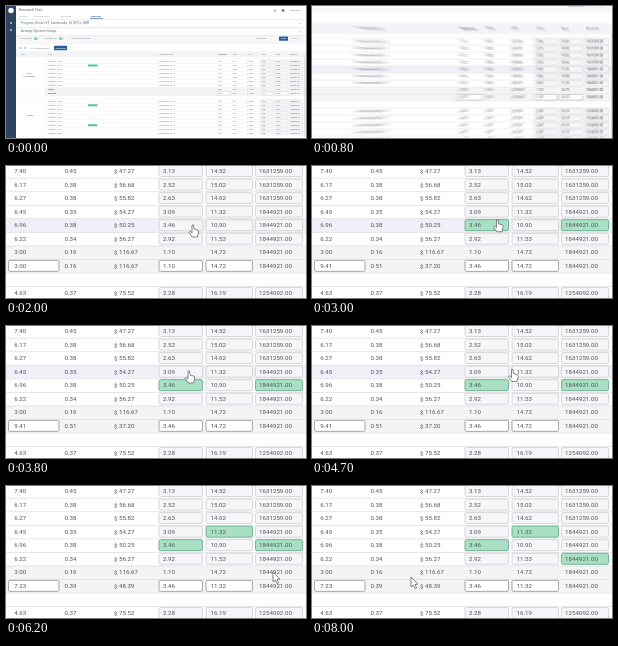
Recreate the animation shown at these times as an HTML page with a canvas. Size 300 px wide and 132 px high, loop 8100 ms.

```html
<!DOCTYPE html>
<html lang="en">
<head>
<meta charset="utf-8">
<style>
html, body { margin: 0; width: 100%; height: 100%; overflow: hidden; background: #fff; }
canvas { display: block; width: 100vw; height: 100vh; }
</style>
</head>
<body>
<canvas id="stage" width="300" height="132"></canvas>
<script>
const W = 300, H = 132, LOOP = 8100, STEP = 100;
const ZOOM = 3.4, FOCUS = { x: 209.5, y: 58 }, ZOOM_MS = 1400;
const ROW_H = 13.55, OTHERS = 7, PROGRAM = 8, GAP = 9, LAST_ROW = 18;
const FONT = 'Roboto, Arial, sans-serif';
const INK = '#50535b', TEAL = '#4fc2a2', NAVY = '#2b4560', BLUE = '#2a5a9a';

const screen = document.getElementById('stage').getContext('2d');
const layer = document.createElement('canvas');
layer.width = W;
layer.height = H;
const ctx = layer.getContext('2d');

const rows = [
  '7.12 0.41 51.36 2.96 13.87 1631259.00',
  '7.40 0.45 47.27 3.13 14.52 1631259.00',
  '6.17 0.38 56.68 2.52 15.02 1631259.00',
  '6.27 0.38 55.82 2.63 14.62 1631259.00',
  '6.45 0.35 54.27 3.09 11.32 1844921.00',
  '6.96 0.38 50.25 3.46 10.90 1844921.00',
  '6.22 0.34 56.27 2.92 11.53 1844921.00',
  '3.00 0.16 116.67 1.10 14.72 1844921.00'
].map(line => line.split(' '));
const secondGroup = ['4.63', '0.37', '75.52', '2.28', '16.19', '1254092.00'];

const columns = [
  { x: 8.2, head: 'Frequency' }, { x: 58.5, head: 'TRPs' }, { x: 108, head: 'CPP' },
  { x: 157, head: 'Price', box: [153, 43.5] },
  { x: 204.5, head: 'Days', box: [200, 46.5] },
  { x: 253, head: 'Revenue', box: [249.5, 47] }
];

// time, x, y in zoomed coordinates
const path = [
  [0, 230, 45], [900, 225, 46], [1600, 187, 63], [2500, 187, 63], [3700, 183, 49],
  [4300, 183, 49], [5100, 218, 46], [5500, 218, 46], [6200, 268, 89],
  [6700, 273, 72], [7100, 273, 72], [7900, 100, 94], [8100, 100, 94]
];

const smooth = u => u * u * (3 - 2 * u);
const clamp = u => Math.max(0, Math.min(1, u));
const rowY = r => 5 + ROW_H * (r - 1);
const isTotal = r => r === OTHERS || r === PROGRAM;

function cursorAt(t) {
  const i = Math.max(1, path.findIndex(k => k[0] >= t));
  const [t0, x0, y0] = path[i - 1], [t1, x1, y1] = path[i];
  const u = smooth(clamp((t - t0) / (t1 - t0)));
  return { x: x0 + (x1 - x0) * u, y: y0 + (y1 - y0) * u };
}

function stateAt(t) {
  const program = rows[OTHERS].slice(), picked = new Set();
  if (t >= 2500) {
    picked.add('5,3');
    program[3] = '3.46';
    picked.add(t < 6900 ? '5,5' : '6,5');
  }
  if (t >= 3000) program.splice(0, 3, '9.41', '0.51', '37.20');
  if (t >= 5300) {
    picked.add('4,4');
    program[4] = '11.32';
  }
  if (t >= 5900) program.splice(0, 3, '7.23', '0.39', '48.39');
  return { program, picked };
}

function rect(x, y, w, h, fill) {
  ctx.fillStyle = fill;
  ctx.fillRect(x, y, w, h);
}

function round(x, y, w, h, r, fill, stroke, width = 0.8) {
  ctx.beginPath();
  ctx.roundRect(x, y, w, h, r);
  ctx.fillStyle = fill;
  ctx.fill();
  if (!stroke) return;
  ctx.strokeStyle = stroke;
  ctx.lineWidth = width;
  ctx.stroke();
}

function dot(x, y, r, fill) {
  round(x - r, y - r, 2 * r, 2 * r, r, fill);
}

function text(s, x, y, size, color = INK, weight = 400, align = 'left') {
  ctx.font = `${weight} ${size}px ${FONT}`;
  ctx.fillStyle = color;
  ctx.textAlign = align;
  ctx.textBaseline = 'middle';
  ctx.fillText(s, x, y);
}

function drawPage() {
  rect(0, 0, W, H, '#fff');
  rect(10, 13, 290, 25, '#eff0f3');
  rect(10, 14.2, 290, 6.6, '#fff');
  rect(10, 22.4, 290, 6.6, '#fff');
  rect(10, 30.5, 290, 7, '#f8f8fb');

  text('Research Tool', 13, 4, 3.6, '#555d6b');
  text('PROJECTS', 13, 10, 1.9, '#8a92a0');
  text('PLANNING TOOLS', 28, 10, 1.9, '#8a92a0');
  text('SCENARIOS', 55, 10, 1.9, '#8a92a0');
  text('INVENTORY', 85, 10, 1.9, BLUE, 700);
  rect(84, 12.2, 13, 0.6, BLUE);
  dot(269, 4.5, 1.1, '#9aa3b0');
  dot(277, 4.5, 1.3, '#596579');
  text('User name', 284, 4.5, 2.2, '#596579');

  text('Program, Desert VT, Landmarks, GI, DPCs, HBR', 15, 17.4, 3.3, '#666c78');
  text('Average Dynamic Usage', 15, 25.4, 3.3, '#666c78');
  text('⌄', 292, 17, 3.5, '#7d8695');
  text('⌄', 292, 25, 3.5, '#7d8695');

  [[13, 'Show all dates'], [38, 'Optimized only']].forEach(([x, label]) => {
    text(label, x, 32.6, 2, '#717987');
    round(x + 15, 31.4, 4.6, 2.3, 1.1, TEAL);
    dot(x + 18.4, 32.5, 0.9, '#fff');
  });
  text('Compare all programs', 65, 32.6, 2, '#717987');
  text('Budget total', 250, 32.6, 2, '#717987');
  round(273, 30.4, 9, 4.4, 0.6, BLUE);
  text('SAVE', 277.5, 32.7, 2, '#fff', 700, 'center');
  round(284, 30.4, 10, 4.4, 0.6, '#fff', '#b9c1cf', 0.3);
  text('RESET', 289, 32.7, 2, '#566174', 400, 'center');

  dot(14.5, 42, 0.8, '#7d8ba0');
  dot(19, 42, 0.8, '#7d8ba0');
  text('ALL COMPETITORS', 24, 42, 2.2, '#657084');
  round(48, 39.7, 13, 4.5, 0.5, BLUE);
  text('ADD ITEMS', 54.5, 42, 2.1, '#fff', 700, 'center');
  rect(10, 45.3, 290, 5.9, '#f3f4f6');
}

function drawLabels() {
  const y = r => FOCUS.y + rowY(r) / ZOOM;
  text('Plan', 15, 48, 2, '#737a86');
  text('Year', 42, 48, 2, '#737a86');
  text('Publishing type', 153.5, 48, 2, '#737a86');
  for (let r = 0; r <= LAST_ROW; r++) {
    if (r === GAP) continue;
    if (isTotal(r)) {
      text(r === OTHERS ? 'Others' : 'Program', 42, y(r), 2.1, INK, 700);
      continue;
    }
    text(`Latitude - ${2014 + (r > GAP ? r - GAP - 1 : r)}`, 42, y(r), 2.1, '#6b6f78');
    text('Commercial Apr 14', 152.5, y(r), 1.95, '#6b6f78');
    if (r % 5 === 1 && r !== 6) round(82, y(r) - 1, 9.5, 2, 0.4, TEAL);
  }
  text('Local', 23, 67, 2.2, INK, 400, 'center');
  text('Competitors', 23, 70, 2.2, INK, 400, 'center');
  text('Florida', 24, 109, 2.2, INK, 400, 'center');
  rect(298.2, 51, 1.2, 80, '#d6d8dd');
}

function drawBands(hover) {
  const left = (10 - FOCUS.x) * ZOOM, width = 290 * ZOOM;
  const rowLeft = (39 - FOCUS.x) * ZOOM, rowWidth = 261 * ZOOM;
  for (let r = 0; r <= LAST_ROW; r++) {
    const top = rowY(r) - ROW_H / 2;
    if (isTotal(r)) rect(rowLeft, top, rowWidth, ROW_H, '#f4f4f5');
    else if (r === hover) rect(rowLeft, top, rowWidth, ROW_H, '#f0f0f9');
    rect(r === GAP || r === GAP + 1 ? left : rowLeft, top, width, 0.8, '#e0e1e5');
  }
  rect(rowLeft, rowY(0) - ROW_H / 2, 0.8, ROW_H * (LAST_ROW + 1), '#e0e1e5');
}

function drawValues({ program, picked }) {
  columns.forEach((c, i) => text(c.head, c.x, -33, 6.6, '#737a86', i ? 400 : 700));
  for (let r = 0; r <= LAST_ROW; r++) {
    if (r === GAP) continue;
    const y = rowY(r);
    const values = r === PROGRAM ? program : r > GAP ? secondGroup : rows[r];
    columns.forEach((c, i) => {
      const editable = r === PROGRAM && (i === 0 || i === 3 || i === 4);
      const box = i === 0 ? [2.5, 50.5] : c.box;
      if (editable) round(box[0], y - 5.5, box[1], 11, 1.5, '#fff', '#8f949e');
      else if (c.box && !isTotal(r)) {
        const on = picked.has(`${r},${i}`);
        round(box[0], y - 5.5, box[1], 11, 1.5, on ? '#a9e0c4' : '#f6f6f8', on ? '#5aa582' : '#cdced4');
      }
      text((i === 2 ? '$ ' : '') + values[i], c.x, y + 0.3, 6.2);
    });
  }
}

function polygon(points) {
  ctx.beginPath();
  points.forEach(([x, y]) => ctx.lineTo(x, y));
  ctx.closePath();
  ctx.fillStyle = '#fff';
  ctx.strokeStyle = '#666';
  ctx.lineWidth = 0.8;
  ctx.lineJoin = 'round';
  ctx.fill();
  ctx.stroke();
}

function drawCursor({ x, y }, hand) {
  ctx.save();
  ctx.translate(x, y);
  polygon(hand
    ? [[-1, -4], [0.5, -4], [1, 0], [5, 1.2], [5.7, 3], [4.5, 8], [-0.8, 8], [-4, 3.2], [-3, 2.2], [-1, 4]]
    : [[-1, -3], [-1, 7], [1.4, 5], [3, 8.5], [4.6, 7.8], [3, 4.5], [6, 4.2]]);
  ctx.restore();
}

function drawSidebar() {
  rect(0, 0, 10, H, NAVY);
  dot(5, 4.5, 2.7, '#fff');
  dot(5, 17, 1.1, '#b3c0d0');
  dot(5, 24, 1.1, '#b3c0d0');
}

function drawScene(t, p) {
  const cursor = cursorAt(t), row = Math.round((cursor.y - 5) / ROW_H) + 1;
  const scale = 1 / (1 - p * (1 - 1 / ZOOM));
  ctx.setTransform(scale, 0, 0, scale, -FOCUS.x * p * scale, -FOCUS.y * p * scale);
  drawPage();
  ctx.save();
  ctx.translate(FOCUS.x, FOCUS.y);
  ctx.scale(1 / ZOOM, 1 / ZOOM);
  drawBands(t < 400 ? -1 : row);
  drawValues(stateAt(t));
  if (t > 1000) drawCursor(cursor, row < OTHERS);
  ctx.restore();
  drawLabels();
  drawSidebar();
}

function render(t) {
  const moving = t > 0 && t < ZOOM_MS, samples = moving ? 7 : 1;
  for (let i = 0; i < samples; i++) {
    const shift = moving ? (i - 3) * 6 : 0;
    drawScene(t, smooth(clamp((t + shift) / ZOOM_MS)));
    screen.globalAlpha = 1 / (i + 1);
    screen.drawImage(layer, 0, 0);
  }
}

const start = performance.now();
function tick() {
  const t = (performance.now() - start) % LOOP;
  render(Math.floor(t / STEP) * STEP);
  requestAnimationFrame(tick);
}
tick();
</script>
</body>
</html>
```
